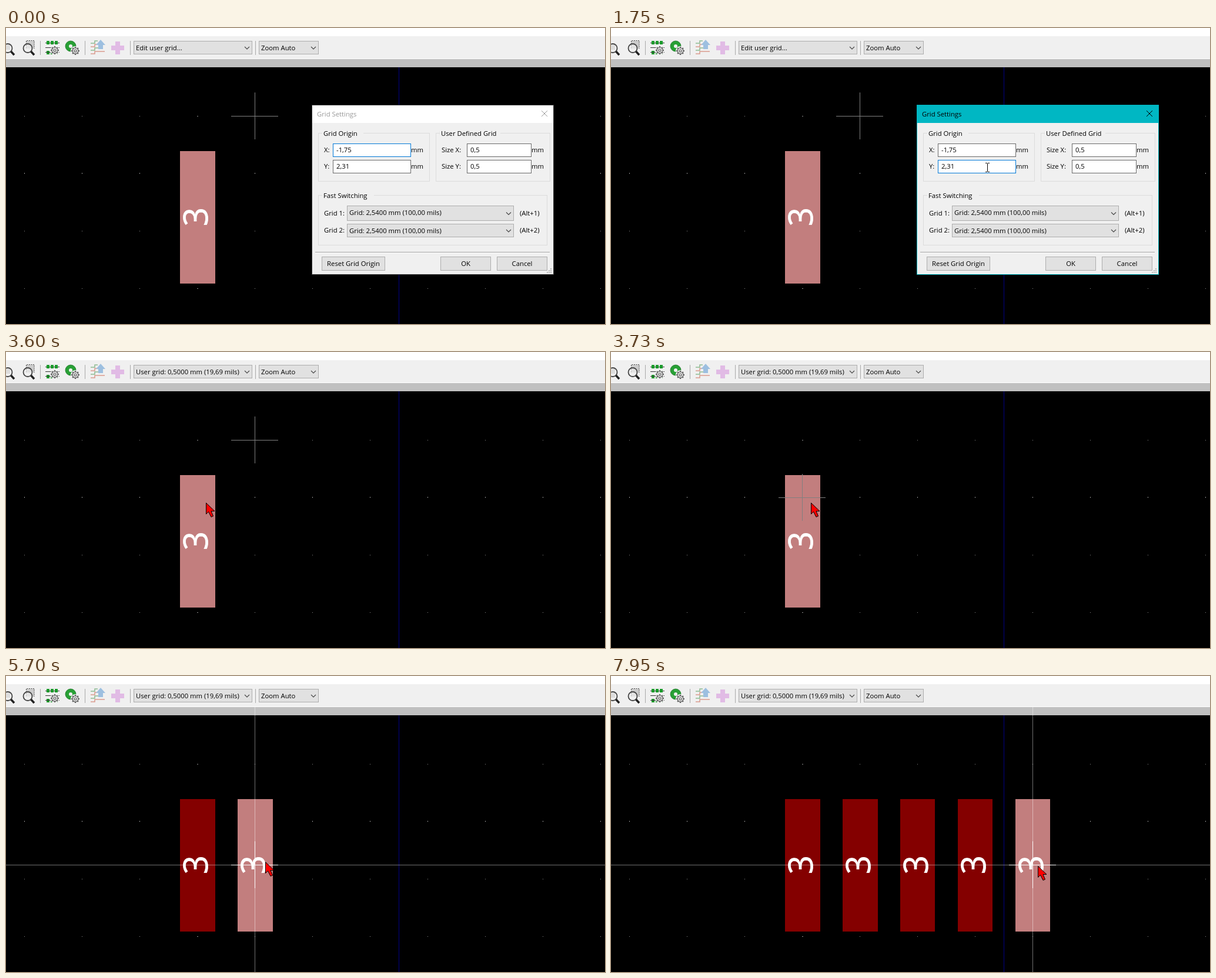
Animation of 1019x505 px, one loop 8 s. Source, as an HTML page with a canvas:

```html
<!DOCTYPE html>
<html lang="en">
<head>
<meta charset="utf-8">
<title>Grid settings</title>
<style>
html, body { margin: 0; width: 100%; height: 100%; overflow: hidden; background: #000; }
canvas { display: block; }
</style>
</head>
<body>
<canvas id="stage" width="1019" height="505"></canvas>
<script>
const ctx = document.getElementById('stage').getContext('2d', { alpha: false });
const LOOP = 8000, PITCH = 98, FIRST_X = 325, PAD_Y = 322, LIFT = 75;
const ACTIVATE = 1130, FOCUS_Y = 1750, PRESS_OK = 2500, CLOSE = 3600, SNAP = 3660, DROP = 5020;
const DUPLICATE = [4200, 5560, 6200, 7130, 7950];
const PLACE = [5290, 5950, 6860, 7670];

const linear = k => k;
const easeIn = k => k ** 3;
const easeOut = k => 1 - (1 - k) ** 3;

// The pointer rests between moves and vanishes before the first one.
const ENTRY = { x: 854, y: 438 };
const MOVES = [
  { start: 490, end: 780, x: 663, y: 209, ease: easeOut },
  { start: ACTIVATE, end: 1400, x: 483, y: 212, ease: linear },
  { start: 1400, end: 1680, x: 640, y: 238, ease: linear },
  { start: FOCUS_Y, end: 2440, x: 771, y: 403, ease: linear },
  { start: 2600, end: 3100, x: 340, y: 257, ease: easeOut },
  { start: DUPLICATE[0], end: 5100, x: 400, y: 316, ease: easeIn },
  { start: DUPLICATE[1], end: 5900, x: 500, y: 318, ease: linear },
  { start: 6530, end: 6670, x: 600, y: 314, ease: easeOut },
  { start: 7200, end: 7540, x: 700, y: 322, ease: linear },
  { start: PLACE[3], end: DUPLICATE[4], x: 726, y: 324, ease: linear }
];

function pointerAt(t) {
  if (t < MOVES[0].start) return null;
  let { x, y } = ENTRY;
  for (const move of MOVES) {
    if (t < move.start) break;
    const k = move.ease(Math.min(1, (t - move.start) / (move.end - move.start)));
    x += (move.x - x) * k;
    y += (move.y - y) * k;
  }
  return { x: Math.round(x), y: Math.round(y) };
}

const count = (times, t) => times.filter(time => time <= t).length;
const inside = (p, r) => p && p.x >= r.x && p.x < r.x + r.w && p.y >= r.y && p.y < r.y + r.h;

function fill(color, x, y, w, h) {
  ctx.fillStyle = color;
  ctx.fillRect(x, y, w, h);
}

function box({ x, y, w, h }, back, border) {
  fill(border, x, y, w, h);
  fill(back, x + 1, y + 1, w - 2, h - 2);
}

function label(text, x, y, color = '#000', align = 'left') {
  ctx.font = '11.3px "Open Sans", "Noto Sans", sans-serif';
  ctx.textAlign = align;
  ctx.fillStyle = color;
  ctx.fillText(text, x, y);
}

function line(color, width, ...points) {
  ctx.strokeStyle = color;
  ctx.lineWidth = width;
  ctx.beginPath();
  for (let i = 0; i < points.length; i += 2) ctx.lineTo(points[i], points[i + 1]);
  ctx.stroke();
}

function disc(color, x, y, r) {
  ctx.beginPath();
  ctx.arc(x, y, r, 0, 7);
  ctx.fillStyle = color;
  ctx.fill();
}

function ring(color, width, x, y, r) {
  ctx.beginPath();
  ctx.arc(x, y, r, 0, 7);
  ctx.strokeStyle = color;
  ctx.lineWidth = width;
  ctx.stroke();
}

function plus(color, x, y, arm) {
  fill(color, x - arm, y, 2 * arm, 1);
  fill(color, x, y - arm, 1, 2 * arm);
}

function combo(rect, text, baseline, hover) {
  box(rect, hover ? '#e5f1fb' : '#e1e1e1', hover ? '#0078d7' : '#adadad');
  label(text, rect.x + 4, baseline);
  const x = rect.x + rect.w - 9, y = rect.y + rect.h / 2;
  line('#444', 1.1, x - 4, y - 1.5, x, y + 2.5, x + 4, y - 1.5);
}

function gear(x, y) {
  disc('#f0f0f0', x, y, 8);
  for (let i = 0; i < 8; i++) {
    const a = i * Math.PI / 4, c = Math.cos(a), s = Math.sin(a);
    line('#666', 2.4, x + 4 * c, y + 4 * s, x + 7 * c, y + 7 * s);
  }
  disc('#e4e4e4', x, y, 5);
  ring('#666', 1.2, x, y, 5);
  ring('#666', 1.2, x, y, 2);
}

function magnifier(x, y) {
  disc('rgba(240,240,240,.65)', x, y, 7.5);
  ring('#444', 1.8, x, y, 7.5);
  line('#222', 3.5, x + 5.5, y + 5.5, x + 11, y + 11.5);
}

function drawIcons() {
  fill('#bbb', 0, 29, 7, 8);
  magnifier(3, 34.5);
  fill('#ccc', 35, 22, 13, 13);
  ctx.setLineDash([2, 1.5]);
  line('#444', 1, 34.5, 34.5, 34.5, 21.5, 48, 21.5, 48, 35);
  ctx.setLineDash([]);
  magnifier(37, 34.5);

  for (let i = 0; i < 3; i++) {
    line('#333', 1, 67, 25.5 + 8 * i, 91, 25.5 + 8 * i);
    for (const y of [22, 39]) fill('#1c9a2c', 69 + 7 * i, y, 5, 6);
  }
  gear(83, 38);
  ring('#28a035', 6, 110, 31, 6);
  ring('#187322', .8, 110, 31, 9);
  gear(118, 39);

  for (let i = 0; i < 4; i++)
    line(i % 2 ? '#d99a8d' : '#8dba91', 1.5, 144, 26 + 6 * i, 151, 26 + 6 * i, 151, 22 + 6 * i, 168 - 4 * (3 - i), 22 + 6 * i);
  fill('#9dbfe0', 157, 28, 8, 8);
  ctx.beginPath();
  ctx.moveTo(161, 20);
  ctx.lineTo(169, 29);
  ctx.lineTo(153, 29);
  ctx.fill();
  fill('#e1bbe5', 186, 23, 8, 22);
  fill('#e1bbe5', 179, 30, 22, 8);
}

function drawToolbar(t) {
  fill('#fff', 0, 0, 1019, 14);
  fill('#f0f0f0', 0, 14, 1019, 38);
  fill('#fff', 0, 52, 1019, 1);
  fill('#c0c0c0', 0, 53, 1019, 14);
  for (const x of [58, 134, 211, 424]) fill('#a8a8a8', x, 22, 1, 24);
  drawIcons();
  const grid = t < PRESS_OK ? 'Edit user grid...' : t < CLOSE ? '' : 'User grid: 0,5000 mm (19,69 mils)';
  combo({ x: 217, y: 22, w: 202, h: 23 }, grid, 38);
  combo({ x: 430, y: 22, w: 102, h: 23 }, 'Zoom Auto', 38);
}

function drawPad(column, y, color) {
  const offset = column * (PITCH - .1);
  const left = Math.round(296 + offset), right = Math.round(355.6 + offset);
  fill(color, left, y - 112, right - left, 226);
  ctx.save();
  ctx.translate(left + 47, y + .3);
  ctx.rotate(-Math.PI / 2);
  ctx.font = '56px "Open Sans", "Noto Sans", sans-serif';
  ctx.textAlign = 'center';
  ctx.fillStyle = ctx.strokeStyle = '#fff';
  ctx.lineWidth = .8;
  ctx.fillText('3', 0, 0);
  ctx.strokeText('3', 0, 0);
  ctx.restore();
}

function drawBoard(t, pointer) {
  fill('#000', 0, 67, 1019, 438);
  for (let y = 150; y < 505; y += PITCH)
    for (let x = 31; x < 1019; x += PITCH)
      fill('#8c8c8c', x, y === 248 ? 247 : y, x === FIRST_X ? 2 : 1, y === 248 ? 2 : 1);
  fill('#000084', 668, 67, 1, 438);

  const copies = count(DUPLICATE, t), placed = count(PLACE, t);
  const dragging = copies > placed;
  const column = pointer ? Math.round((pointer.x - FIRST_X) / PITCH) : 0;
  const lift = t < DROP ? LIFT : 0;

  for (let i = 0; i < copies; i++) drawPad(i, PAD_Y, '#840000');
  drawPad(dragging ? column : placed, PAD_Y - (dragging ? lift : 0), '#c27e7e');

  if (dragging) {
    ctx.globalCompositeOperation = 'screen';
    fill('#707070', FIRST_X + (copies - 1) * PITCH, 53, 1, 452);
    fill('#707070', 0, PAD_Y, 1019, 1);
    ctx.globalCompositeOperation = 'source-over';
  }
  if (t < SNAP) plus('#808080', 423, 150, 40);
  else plus(dragging ? '#fff' : '#808080', FIRST_X + column * PITCH, lift ? 248 : PAD_Y, 40);
}

function group(x, y, w, h, title, titleWidth) {
  box({ x, y, w, h }, '#f0f0f0', '#dcdcdc');
  fill('#f0f0f0', x + 7, y, titleWidth, 1);
  label(title, x + 9, y + 5);
}

const fieldRect = (x, w, row) => ({ x, y: 197 + 28 * row, w, h: 23 });
const ORIGIN = [0, 1].map(row => fieldRect(556, 133, row));

function field(rect, name, nameX, value, pointer, focused) {
  const base = rect.y + 15;
  label(name, nameX, base);
  box(rect, '#fff', focused ? '#0078d7' : inside(pointer, rect) ? '#171717' : '#6a6a6a');
  label(value, rect.x + 6, base);
  label('mm', rect.x + rect.w, base);
}

function button(x, w, text, back = '#e1e1e1', border = '#adadad') {
  box({ x, y: 390, w, h: 24 }, back, border);
  label(text, x + w / 2, 406, '#000', 'center');
}

function drawDialog(t, pointer) {
  const active = t >= ACTIVATE;
  const ink = active ? '#000' : '#999';
  box({ x: 520, y: 131, w: 412, h: 290 }, '#f0f0f0', active ? '#00b7c3' : '#3c3c3c');
  fill(active ? '#00b7c3' : '#fff', 521, 132, 410, 30);
  label('Grid Settings', 529, 151, ink);
  line(ink, 1, 911, 141, 921, 151);
  line(ink, 1, 921, 141, 911, 151);

  group(531, 179, 190, 83, 'Grid Origin', 70);
  group(731, 179, 195, 83, 'User Defined Grid', 103);
  group(531, 285, 390, 86, 'Fast Switching', 88);

  const focusX = t < 120 || (active && t < FOCUS_Y);
  field(ORIGIN[0], 'X:', 541, '-1,75', pointer, focusX);
  field(ORIGIN[1], 'Y:', 541, '2,31', pointer, t >= FOCUS_Y);
  ['X', 'Y'].forEach((axis, row) =>
    field(fieldRect(784, 110, row), `Size ${axis}:`, 741, '0,5', pointer));

  const hover = rect => active && t < PRESS_OK && inside(pointer, rect);
  for (let i = 0; i < 2; i++) {
    const rect = { x: 580, y: 303 + 31 * i, w: 284, h: 26 - 3 * i };
    const base = 320 + 29 * i;
    label(`Grid ${i + 1}:`, 541, base);
    combo(rect, 'Grid: 2,5400 mm (100,00 mils)', rect.y + 16, hover(rect));
    label(`(Alt+${i + 1})`, 874, base);
  }

  fill('#a0a0a0', 526, 382, 399, 1);
  fill('#fff', 526, 383, 399, 1);
  button(537, 108, 'Reset Grid Origin');
  const okLook = t >= PRESS_OK ? ['#cce4f7', '#005499']
    : hover({ x: 739, y: 390, w: 86, h: 24 }) ? ['#e5f1fb', '#0078d7'] : [];
  button(739, 86, 'OK', ...okLook);
  button(835, 86, 'Cancel');
  for (let i = 0; i < 3; i++)
    for (let j = 2 - i; j < 3; j++) fill('#b8b8b8', 920 + 3 * j, 410 + 3 * i, 2, 2);
}

function drawTextPointer({ x, y }) {
  ctx.globalCompositeOperation = 'difference';
  fill('#fff', x, y - 7, 1, 14);
  for (const end of [y - 8, y + 7])
    for (const side of [x - 3, x + 1]) fill('#fff', side, end, 3, 1);
  ctx.globalCompositeOperation = 'source-over';
}

const ARROW = new Path2D('M0 0V19L4 15L8.5 24L12 22.5L8.5 14H14.5Z');

function drawArrow({ x, y }) {
  ctx.save();
  ctx.translate(x + .5, y + .5);
  ctx.fillStyle = '#f00';
  ctx.fill(ARROW);
  ctx.strokeStyle = '#000';
  ctx.lineWidth = 1;
  ctx.stroke(ARROW);
  ctx.restore();
}

function draw() {
  const t = performance.now() % LOOP;
  const pointer = pointerAt(t);
  drawToolbar(t);
  drawBoard(t, pointer);
  if (t < CLOSE) drawDialog(t, pointer);
  if (pointer) {
    const selecting = t >= ACTIVATE && t < 1450;
    const overField = t < CLOSE && ORIGIN.some(rect => inside(pointer, rect));
    (selecting || overField ? drawTextPointer : drawArrow)(pointer);
  }
  requestAnimationFrame(draw);
}
draw();
</script>
</body>
</html>
```
